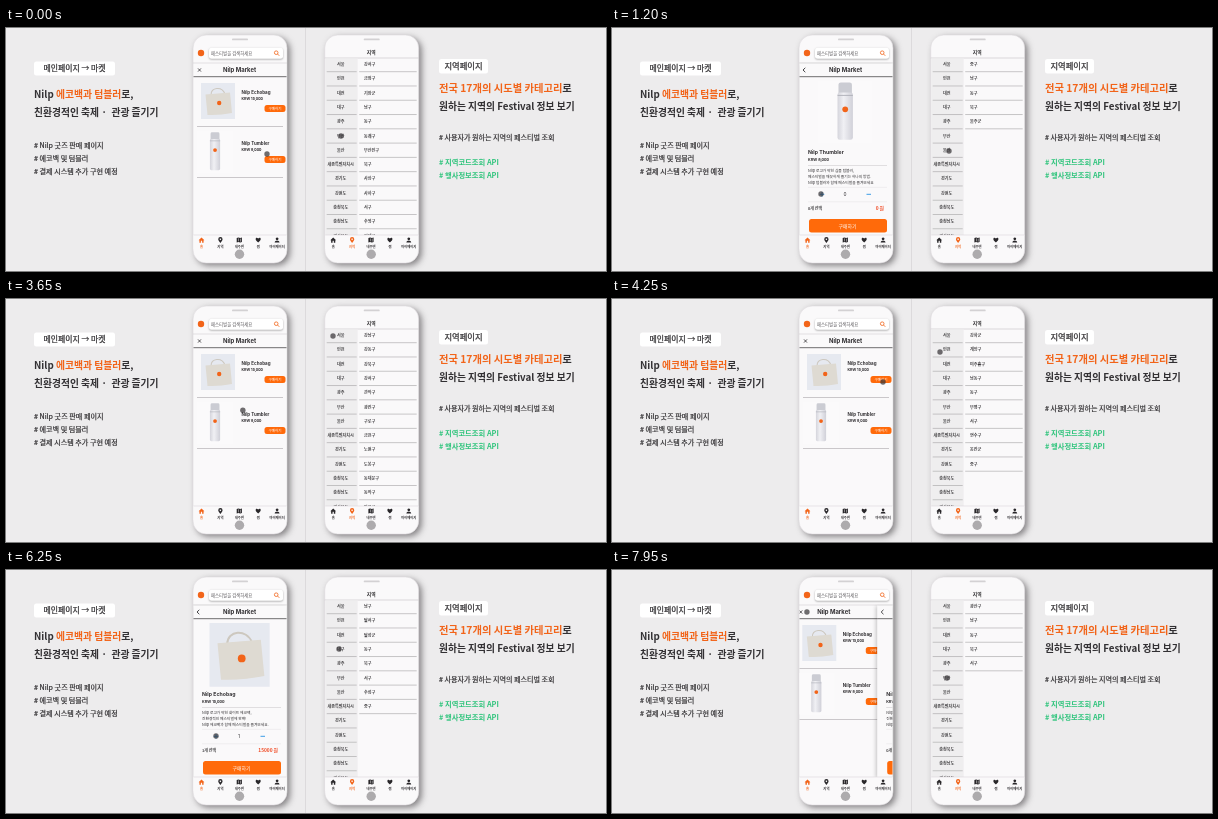
An HTML page with a canvas for the animation above (8000 ms loop, 600 by 243 pixels).

```html
<!DOCTYPE html>
<html lang="ko">
<head>
<meta charset="utf-8">
<title>Festival app: market and region pages</title>
<style>
html, body { margin: 0; width: 100%; height: 100%; overflow: hidden; background: #edeced; }
canvas { display: block; width: 600px; height: 243px; }
</style>
</head>
<body>
<canvas id="stage"></canvas>
<script>
const W = 600, H = 243, LOOP = 8000;
const ORANGE = '#f26419', BUTTON = '#ff6a0a', INK = '#323033', GREEN = '#2fc47c', PAPER = '#faf9fa';
const SANS = '"Noto Sans CJK KR", "Noto Sans CJK", "Noto Sans", sans-serif';
const LATIN = 'Inter, "Noto Sans CJK KR", "Noto Sans CJK", sans-serif';
const BRAND = 'Nilp';

const canvas = document.getElementById('stage');
const ctx = canvas.getContext('2d');
const ratio = window.devicePixelRatio || 1;
canvas.width = W * ratio;
canvas.height = H * ratio;

const REGIONS = ['서울', '인천', '대전', '대구', '광주', '부산', '울산', '세종특별자치시',
  '경기도', '강원도', '충청북도', '충청남도', '경상북도'];
const DISTRICTS = {
  서울: '강남구 강동구 강북구 강서구 관악구 광진구 구로구 금천구 노원구 도봉구 동대문구 동작구 마포구',
  인천: '강화군 계양구 미추홀구 남동구 동구 부평구 서구 연수구 옹진군 중구',
  대전: '대덕구 동구 서구 유성구 중구',
  대구: '남구 달서구 달성군 동구 북구 서구 수성구 중구',
  광주: '광산구 남구 동구 북구 서구',
  부산: '강서구 금정구 기장군 남구 동구 동래구 부산진구 북구 사상구 사하구 서구 수영구 연제구',
  울산: '중구 남구 동구 북구 울주군'
};
const SELECTIONS = [[0, '부산'], [1000, '울산'], [3050, '서울'], [4220, '인천'],
  [5150, '대전'], [6150, '대구'], [7200, '광주']];

const BAG = {
  name: 'Echobag', price: 'KRW 15,000',
  about: [`${BRAND} 로고가 박힌 화이트 에코백,`, '친환경적인 페스티벌에 완벽!', `${BRAND} 에코백과 함께 페스티벌을 즐겨보세요.`]
};
const TUMBLER = {
  name: 'Thumbler', price: 'KRW 8,000',
  about: [`${BRAND} 로고가 박힌 심플 텀블러,`, '페스티벌을 깨끗하게 즐기는 하나의 방법.', `${BRAND} 텀블러와 함께 페스티벌을 즐겨보세요`]
};

// Pointer paths: [time, x, y]; the pointer is hidden outside each path.
const MARKET_POINTER = [
  [[0, 261, 126], [150, 266, 130], [450, 266, 130], [1000, 209, 166], [1900, 209, 166]],
  [[3600, 236, 112], [4150, 271, 83], [4450, 271, 83], [5150, 222, 166], [5250, 222, 166],
   [5450, 210, 166], [6300, 210, 166], [6900, 256, 169], [7300, 256, 169], [7700, 194, 42], [8000, 195, 42]]
];
const REGION_POINTER = [
  [[0, 335, 108], [500, 335, 108], [900, 337, 123], [1900, 337, 123]],
  [[3300, 327, 37], [3800, 327, 37], [4150, 328, 53], [4700, 328, 53], [5100, 331, 64], [5700, 331, 64],
   [6050, 333, 79], [6600, 333, 79], [6950, 335, 94], [7450, 335, 94], [7850, 335, 108], [8000, 335, 108]]
];

const clamp = v => Math.max(0, Math.min(1, v));
const easeOut = p => 1 - (1 - clamp(p)) ** 3;
const smooth = p => p * p * (3 - 2 * p);
const mix = (a, b, p) => a + (b - a) * p;

function text(str, x, y, size, { color = INK, weight = 400, align = 'left', font = SANS } = {}) {
  ctx.font = `${weight} ${size}px ${font}`;
  ctx.fillStyle = ctx.strokeStyle = color;
  ctx.textAlign = align;
  ctx.textBaseline = 'alphabetic';
  const baseline = y + size * 0.36;
  ctx.fillText(str, x, baseline);
  // A hairline outline stands in for the missing medium weight.
  if (weight === 500) {
    ctx.lineWidth = size * 0.03;
    ctx.lineJoin = 'round';
    ctx.strokeText(str, x, baseline);
  }
  return x + ctx.measureText(str).width;
}

function box(x, y, w, h, color, radius = 0) {
  ctx.fillStyle = color;
  ctx.beginPath();
  ctx.roundRect(x, y, w, h, radius);
  ctx.fill();
}

function dot(x, y, r, color) {
  ctx.fillStyle = color;
  ctx.beginPath();
  ctx.arc(x, y, r, 0, Math.PI * 2);
  ctx.fill();
}

function line(x1, y1, x2, y2, color = '#c9c7c9', width = 0.6) {
  ctx.strokeStyle = color;
  ctx.lineWidth = width;
  ctx.beginPath();
  ctx.moveTo(x1, y1);
  ctx.lineTo(x2, y2);
  ctx.stroke();
}

function withShadow(color, blur, dx, dy, draw) {
  ctx.save();
  ctx.shadowColor = color;
  ctx.shadowBlur = blur * ratio;
  ctx.shadowOffsetX = dx * ratio;
  ctx.shadowOffsetY = dy * ratio;
  draw();
  ctx.restore();
}

function clipped(x, y, w, h, draw) {
  ctx.save();
  ctx.beginPath();
  ctx.rect(x, y, w, h);
  ctx.clip();
  draw();
  ctx.restore();
}

function tag(str, x, y, w, h, size) {
  box(x, y, w, h, '#fff', 2.5);
  text(str, x + w / 2, y + h / 2, size, { weight: 500, align: 'center' });
}

function captions() {
  const bold = { weight: 600 }, accent = { weight: 600, color: ORANGE };
  tag('메인페이지 → 마켓', 28, 33.5, 81, 14, 7.9);
  let x = text(BRAND + ' ', 28, 66, 9.8, bold);
  x = text('에코백과 텀블러', x, 66, 9.8, accent);
  text('로,', x, 66, 9.8, bold);
  text('친환경적인 축제 ·  관광 즐기기', 28, 84, 9.75, bold);
  [`# ${BRAND} 굿즈 판매 페이지`, '# 에코백 및 텀블러', '# 결제 시스템 추가 구현 예정']
    .forEach((s, i) => text(s, 28, 117 + i * 13, 7.1, { weight: 500 }));

  tag('지역페이지', 433, 31, 49, 14.5, 8.3);
  x = text('전국 17개의 시도별 카테고리', 433, 60, 10.3, accent);
  text('로', x, 60, 10.3, bold);
  text('원하는 지역의 Festival 정보 보기', 433, 78.5, 9.75, bold);
  text('# 사용자가 원하는 지역의 페스티벌 조회', 433, 109, 7.05, { weight: 500 });
  text('# 지역코드조회 API', 433, 134, 7.3, { weight: 600, color: GREEN });
  text('# 행사정보조회 API', 433, 147, 7.3, { weight: 600, color: GREEN });
}

function phone(x) {
  withShadow('rgba(60,57,60,.6)', 6, 3, 2.5, () => box(x, 7, 94, 228, PAPER, 13));
  ctx.strokeStyle = '#dddbdd';
  ctx.lineWidth = 0.6;
  ctx.beginPath();
  ctx.roundRect(x, 7, 94, 228, 13);
  ctx.stroke();
  box(x + 39, 10.5, 16, 1.8, '#d3d1d3', 1);
  dot(x + 46.5, 226.3, 4.7, '#adabad');
}

const ICONS = [
  'M-3.2 .2L0-2.9 3.2 .2H2.3V3H.7V.9H-.7V3H-2.3V.2Z',
  'M0 3.3C-1.6 1.2-2.4 .2-2.4-.9A2.4 2.4 0 0 1 2.4-.9C2.4 .2 1.6 1.2 0 3.3ZM0-1.8A.9 .9 0 1 0 .01-1.8Z',
  'M-2.9-2.2L-1-2.8 1-2.2 2.9-2.8V2.2L1 2.8-1 2.2-2.9 2.8ZM-1-2V1.5L-.5 1.7V-1.8ZM1-1.5V2L1.5 1.8V-1.7Z',
  'M0 2.7C-4.8-.4-2.6-4 0-1.6 2.6-4 4.8-.4 0 2.7Z',
  'M0-2.9A1.5 1.5 0 1 0 .01-2.9ZM-2.7 2.8C-2.7-.2 2.7-.2 2.7 2.8Z'
].map(d => new Path2D(d));

function tabs(x, active) {
  box(x + 0.5, 207, 93, 14, PAPER);
  line(x + 0.5, 207, x + 93.5, 207, '#d8d6d8');
  ['홈', '지역', '내주변', '찜', '마이페이지'].forEach((label, i) => {
    const cx = x + 8.5 + i * 18.9, color = i === active ? ORANGE : '#29272a';
    ctx.save();
    ctx.translate(cx, 212);
    ctx.scale(0.9, 0.9);
    ctx.fillStyle = color;
    ctx.fill(ICONS[i], 'evenodd');
    ctx.restore();
    text(label, cx, 218.6, 3.3, { color, align: 'center', weight: 500 });
  });
}

function drawBag(x, y, s) {
  ctx.save();
  ctx.translate(x, y);
  ctx.scale(s, s);
  box(0, 0, 34, 36, '#e6e9f0');
  ctx.strokeStyle = '#cdc8bf';
  ctx.lineWidth = 1.1;
  ctx.beginPath();
  ctx.moveTo(10, 12);
  ctx.bezierCurveTo(10, 4, 21, 3, 24, 11);
  ctx.stroke();
  ctx.fillStyle = '#dedad2';
  ctx.beginPath();
  ctx.moveTo(4.5, 11.5);
  ctx.lineTo(29, 9.5);
  ctx.lineTo(31, 30);
  ctx.quadraticCurveTo(19, 32.5, 6.5, 32);
  ctx.fill();
  dot(18.2, 20, 2.2, ORANGE);
  ctx.restore();
}

function drawTumbler(x, y, s) {
  ctx.save();
  ctx.translate(x, y);
  ctx.scale(s, s);
  box(0, 0, 34, 39, '#fbfafb');
  const shade = ctx.createLinearGradient(12.2, 0, 21.8, 0);
  shade.addColorStop(0, '#d5d5dc');
  shade.addColorStop(0.4, '#f0f0f4');
  shade.addColorStop(1, '#d0d0d8');
  box(12.8, 1.2, 8.4, 8, '#cbccd3', 1.4);
  box(12.2, 7.5, 9.6, 29.5, shade, 1.4);
  line(12.2, 9.3, 21.8, 9.3, '#b0b1b9', 0.6);
  dot(17, 18, 1.8, ORANGE);
  ctx.restore();
}

function marketTitle(x) {
  text(BRAND + ' Market', x + 46.5, 42, 5.9, { weight: 700, align: 'center', font: LATIN });
}

function marketRow(x, y, name, price) {
  text(`${BRAND} ${name}`, x + 48.5, y, 4.5, { weight: 700, font: LATIN });
  text(price, x + 48.5, y + 7, 3.7, { weight: 500, font: LATIN });
  box(x + 71.5, y + 13, 21, 7, BUTTON, 2.5);
  text('구매하기', x + 82, y + 16.5, 3.6, { color: '#fff', align: 'center' });
}

function marketList(x, titleShift) {
  line(x + 5, 40.4, x + 8, 43.6, INK, 0.8);
  line(x + 8, 40.4, x + 5, 43.6, INK, 0.8);
  marketTitle(x + titleShift);
  line(x, 48.7, x + 94, 48.7, '#4a484b', 0.8);
  drawBag(x + 8, 55, 1);
  marketRow(x, 64, 'Echobag', BAG.price);
  line(x + 4, 98.5, x + 90, 98.5, '#a9a7a9');
  drawTumbler(x + 4, 103, 1.06);
  marketRow(x, 115, 'Tumbler', TUMBLER.price);
  line(x + 4, 149.5, x + 90, 149.5, '#a9a7a9');
}

function detail(x, item, count, minusPressed) {
  withShadow('rgba(0,0,0,.22)', 4, -1, 0, () => box(x, 35.5, 94, 172, PAPER));
  line(x + 6.3, 39.8, x + 4, 42, INK, 0.9);
  line(x + 4, 42, x + 6.3, 44.2, INK, 0.9);
  marketTitle(x);
  line(x, 48.7, x + 94, 48.7, '#4a484b', 0.8);
  if (item === BAG) drawBag(x + 16.5, 53, 1.77);
  else drawTumbler(x + 19, 52.5, 1.6);
  text(`${BRAND} ${item.name}`, x + 9, 124.5, 5.2, { weight: 700, font: LATIN });
  text(item.price, x + 9, 132, 3.9, { weight: 500, font: LATIN });
  line(x + 9, 137.5, x + 88, 137.5, '#cfcdcf');
  item.about.forEach((s, i) => text(s, x + 9, 143 + i * 6, 3.75));
  line(x + 9, 159.3, x + 88, 159.3, '#e6e4e6');
  if (minusPressed) box(x + 64, 164.5, 12, 8.5, '#c5dcef', 1.5);
  const blue = '#2793e6';
  line(x + 20.7, 166.3, x + 25.3, 166.3, blue, 0.9);
  line(x + 23, 164, x + 23, 168.6, blue, 0.9);
  text(count, x + 46, 166.3, 4.8, { align: 'center', font: LATIN });
  line(x + 67.5, 166.3, x + 72, 166.3, blue, 0.9);
  line(x + 9, 173.8, x + 88, 173.8, '#e6e4e6');
  text(`${count}개 선택`, x + 9, 180.7, 4, { weight: 500 });
  text(`${count * 15000} 원`, x + 85, 180.7, 4.8, { weight: 700, align: 'right', color: '#f04a23' });
  box(x + 10, 191, 78, 13.5, BUTTON, 2.5);
  text('구매하기', x + 48.5, 197.8, 4.9, { color: '#fff', align: 'center' });
}

function marketState(t) {
  if (t < 3050) return { item: TUMBLER, open: easeOut((t - 300) / 500), count: t < 1350 ? 0 : 1 };
  const open = t < 7727 ? easeOut((t - 4400) / 500) : 1 - easeOut((t - 7727) / 500);
  return { item: BAG, open, count: t > 5600 && t < 7250 ? 1 : 0, minusPressed: t > 7050 && t < 7300 };
}

function marketPhone(t) {
  const x = 187;
  phone(x);
  dot(x + 8, 25, 3.2, ORANGE);
  withShadow('rgba(0,0,0,.35)', 2, 0, 0.6, () => box(x + 16, 19.8, 74, 11, '#fff', 2.5));
  text('페스티벌을 검색하세요', x + 18, 25.3, 4.4, { color: '#5f5d60' });
  ctx.strokeStyle = ORANGE;
  ctx.lineWidth = 0.8;
  ctx.beginPath();
  ctx.arc(x + 83.2, 24.7, 1.8, 0, Math.PI * 2);
  ctx.stroke();
  line(x + 84.5, 26, x + 86.3, 27.8, ORANGE, 0.8);
  line(x, 35, x + 94, 35, '#d0ced0');

  const { item, open, count, minusPressed } = marketState(t);
  clipped(x + 0.5, 34.5, 93, 172.5, () => {
    if (open < 1) marketList(x - open * 28, -open * 42);
    if (open > 0) detail(x + (1 - open) * 94, item, count, minusPressed);
  });
  tabs(x, 0);
}

function regionPhone(t) {
  const x = 318.7, pitch = 14.28;
  phone(x);
  text('지역', x + 46.5, 23.8, 4.8, { weight: 700, align: 'center' });
  line(x, 30, x + 94, 30, '#c4c2c4');
  const selected = SELECTIONS.filter(([start]) => start <= t).pop()[1];
  clipped(x + 0.5, 30.3, 93, 176.7, () => {
    box(x, 30.3, 33, 177, '#efeeef');
    REGIONS.forEach((name, i) => {
      const y = 36.7 + i * pitch;
      text(name, x + 16, y, 4.1, { align: 'center', weight: 500 });
      line(x + 2, y + 7, x + 32, y + 7, '#a5a3a5');
    });
    DISTRICTS[selected].split(' ').forEach((name, i) => {
      const y = 36.7 + i * pitch;
      text(name, x + 39.3, y, 4.1, { weight: 500 });
      line(x + 34.5, y + 7, x + 92, y + 7, '#a5a3a5');
    });
  });
  tabs(x, 1);
}

function pointer(paths, t) {
  for (const path of paths) {
    const next = path.findIndex(([time]) => time > t);
    if (next < 1) continue;
    const [t0, x0, y0] = path[next - 1], [t1, x1, y1] = path[next];
    const p = smooth((t - t0) / (t1 - t0));
    dot(mix(x0, x1, p), mix(y0, y1, p), 2.7, 'rgba(55,52,56,.72)');
  }
}

function render(t) {
  ctx.setTransform(ratio, 0, 0, ratio, 0, 0);
  box(0, 0, W, H, '#edeced');
  line(299.5, 0, 299.5, H, '#dcdadc', 1);
  captions();
  marketPhone(t);
  regionPhone(t);
  pointer(MARKET_POINTER, t);
  pointer(REGION_POINTER, t);
}

const start = performance.now();
function tick() {
  render((performance.now() - start) % LOOP);
  requestAnimationFrame(tick);
}
tick();
</script>
</body>
</html>
```
